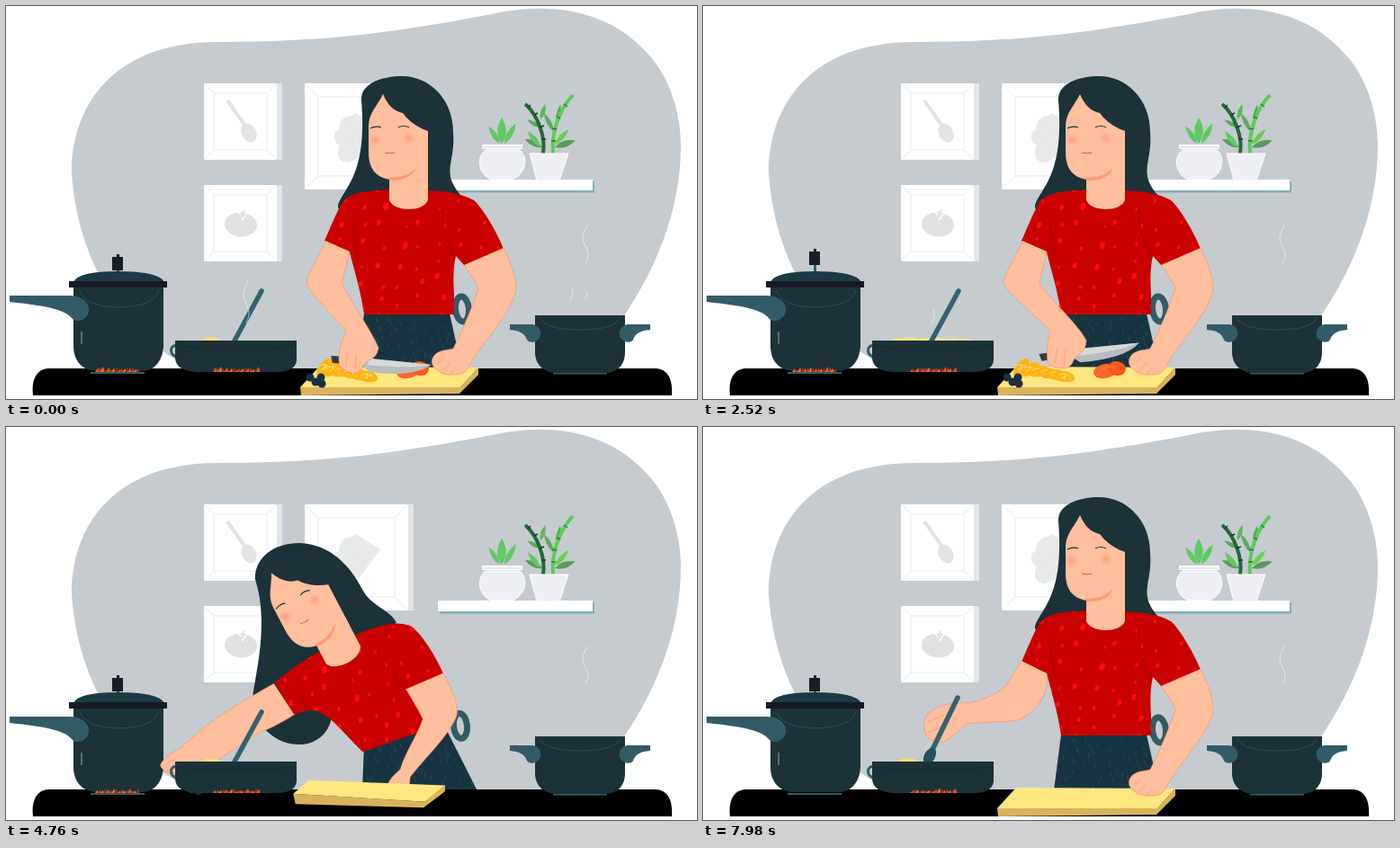
An HTML page with a canvas that plays this animation: 768 by 437 pixels, repeating every 8 s.

```html
<!DOCTYPE html>
<html lang="en">
<head>
<meta charset="utf-8">
<title>Kitchen</title>
<style>
html, body { margin: 0; width: 100%; height: 100%; overflow: hidden; background: #fff; }
canvas { display: block; width: 768px; height: 437px; }
</style>
</head>
<body>
<canvas id="stage"></canvas>
<script>
const LOOP = 8000, TAU = Math.PI * 2;
const SKIN = '#ffbe9d', LINE = '#f58f62', HAIR = '#1c3238', TEAL = '#335b66', RED = '#c90000';
const canvas = document.getElementById('stage'), g = canvas.getContext('2d');
const dpr = window.devicePixelRatio || 1;
canvas.width = 768 * dpr;
canvas.height = 437 * dpr;

// ---------- helpers ----------
const NUM = /-?[\d.]+/g;
const smooth = s => s * s * (3 - 2 * s);
const hash = n => { const v = Math.sin(n * 127.1 + 11.7) * 43758.5453; return v - Math.floor(v); };

function mix(a, b, s) {
  const target = b.match(NUM);
  let i = 0;
  return a.replace(NUM, v => (+v + (target[i++] - v) * s).toFixed(2));
}

// keys: [[time, string of numbers], ...]
function tween(keys, t) {
  if (t <= keys[0][0]) return keys[0][1];
  for (let i = 1; i < keys.length; i++) {
    const [t0, a] = keys[i - 1], [t1, b] = keys[i];
    if (t < t1) return mix(a, b, smooth((t - t0) / (t1 - t0)));
  }
  return keys[keys.length - 1][1];
}
const numbers = s => s.match(NUM).map(Number);

function fill(d, color) { g.fillStyle = color; g.fill(new Path2D(d)); }
function line(d, color, width = 1) {
  g.strokeStyle = color;
  g.lineWidth = width;
  g.stroke(new Path2D(d));
}
function oval(x, y, rx, ry, color, angle = 0) {
  g.fillStyle = color;
  g.beginPath();
  g.ellipse(x, y, rx, ry, angle, 0, TAU);
  g.fill();
}
function rect(x, y, w, h, color) { g.fillStyle = color; g.fillRect(x, y, w, h); }
function group(draw) { g.save(); draw(); g.restore(); }
function leaf(x, y, degrees, length, width, color) {
  group(() => {
    g.translate(x, y);
    g.rotate(degrees * Math.PI / 180);
    fill(`M0 0 Q${length * .45} ${-width} ${length} 0 Q${length * .45} ${width} 0 0Z`, color);
  });
}

// ---------- poses ----------
const lean = (up, mid, low) => [[2600, up], [3700, mid], [4250, mid], [5000, low], [5700, low], [6600, up]];

const headKeys = lean('447 215 0', '393 243 -17', '368 256 -31');

const hairKeys = lean(
  'M395 105 C394 85 420 78 440 78 C472 78 497 105 497 140 C500 175 482 185 507 212 C490 222 450 230 430 232 C400 235 368 235 369 222 C374 203 402 190 395 105Z',
  'M308 158 C307 132 326 116 356 116 C391 117 411 143 420 174 C425 200 440 206 452 218 C430 240 400 270 385 310 C370 352 300 347 303 300 C305 265 325 225 308 158Z',
  'M267 172 C267 148 290 133 317 133 C350 134 374 158 388 182 C400 200 420 200 428 217 C410 240 370 290 354 330 C345 376 270 364 265 300 C270 270 282 215 267 172Z');

const shirtKeys = lean(
  'M428 204 C405 206 385 205 374 218 C366 232 360 248 354 261 L382 274 C388 297 395 320 398 343 L498 343 L498 320 C497 305 497 290 500 278 L510 289 L553 270 C545 250 530 225 520 216 C505 208 490 206 469 205Z',
  'M370 228 C358 232 346 236 338 242 C330 248 324 253 320 258 L334 295 C358 285 372 318 395 353 L479 338 L484 322 C480 310 470 300 466 288 L466 291 L506 273 C497 255 485 232 470 220 C455 214 435 216 414 217Z',
  'M345 254 C330 264 315 275 308 280 C302 285 296 289 292 293 L316 329 C345 310 355 325 397 364 L450 341 L457 325 C452 315 445 305 439 292 L439 293 L480 275 C470 252 455 230 444 222 C425 214 405 224 387 233Z');

const skirtKeys = lean(
  'M398 342 L480 342 L493 342 L507 404 L390 404Z',
  'M397 351 L479 336 L490 345 L519 404 L396 404Z',
  'M398 362 L450 340 L490 335 L525 404 L396 404Z');

const bowKeys = lean('507 337', '508 340', '504 330');

const rightArmKeys = lean(
  'M553 269 C560 285 570 305 566 320 C558 345 530 375 517 396 C512 408 508 410 498 410 C485 412 470 402 474 392 C478 382 490 383 497 381 C510 355 520 330 525 314 C522 305 515 298 509 288 M478 399 L487 392 M485 405 L494 397 M493 409 L500 402',
  'M506 272 C514 288 523 305 519 320 C512 345 490 370 478 388 C475 400 470 418 458 419 C450 422 435 418 442 410 C450 400 455 385 462 378 C470 355 480 335 484 322 C478 310 470 300 465 290 M444 417 L448 412 M450 419 L454 413 M456 419 L460 413',
  'M480 274 C488 290 498 310 495 322 C485 345 455 370 440 390 C440 398 442 402 434 402 C425 402 417 402 418 396 C420 385 428 385 431 381 C435 365 450 345 457 326 C452 315 445 303 438 292 M423 401 L427 390 M430 401 L434 393 M436 401 L439 392');

const leftArm = {
  cut: 'M355 261 C348 278 335 298 334 308 C336 318 365 345 378 362 C372 375 368 390 371 400 C376 408 392 412 396 402 C400 392 412 395 414 380 C408 365 385 330 373 309 C376 295 380 285 382 273 M380 384 L378 401 M389 387 L388 405',
  raise: 'M355 261 C348 278 335 298 334 308 C336 318 375 348 386 362 C382 375 381 390 384 398 C392 404 408 405 411 396 C415 385 425 388 426 372 C420 358 390 330 374 309 C376 295 380 285 382 273 M394 380 L391 398 M403 382 L401 401',
  reach: 'M319 258 C300 266 280 275 265 283 C250 290 225 312 214 320 C195 325 182 326 176 333 C180 342 174 352 180 360 C190 372 200 370 205 368 C214 352 222 340 240 333 C275 322 310 306 334 294 M176 342 L194 346 M178 352 L194 355',
  knob: 'M291 294 C272 306 255 316 240 326 C222 338 200 356 189 368 C180 374 172 382 170 390 C174 398 184 396 190 392 C205 388 220 385 230 380 C260 365 285 350 295 342 C303 338 310 333 316 328 M173 388 L186 377 M178 393 L188 383',
  rest: 'M356 262 C350 280 338 300 338 316 C340 335 349 360 350 378 C340 392 322 402 319 408 C335 412 355 408 370 405 C380 406 390 406 390 401 C376 390 370 345 372 318 C378 300 384 285 385 275 M324 405 L344 396 M338 408 L354 399',
  stir: 'M354 260 C348 270 342 278 337 288 C325 298 308 305 295 307 C275 305 245 312 246 330 C244 345 255 352 268 350 C278 344 288 335 292 330 C310 328 340 328 350 326 C368 318 385 300 382 274 M250 328 L268 320 M250 339 L270 332'
};
const leftArmKeys = [[2600, leftArm.raise], [3700, leftArm.reach], [4250, leftArm.reach], [5000, leftArm.knob],
  [5700, leftArm.knob], [6500, leftArm.rest], [6900, leftArm.rest], [7600, leftArm.stir]];

const boardTopKeys = lean('M348 401 L525 402 L505 424 L327 424Z', 'M346 370 L498 387 L478 410 L323 394Z', 'M334 400 L485 402 L462 419 L318 412Z');
const boardSideKeys = lean(
  'M327 424 L505 424 L525 402 L525 410 L504 431 L328 433Z',
  'M323 394 L478 410 L498 387 L497 397 L477 418 L324 404Z',
  'M318 412 L462 419 L485 402 L485 408 L460 425 L321 424Z');
// shift x, shift y, angle, extra tomato shift
const foodKeys = [[2600, '0 0 0 0'], [3700, '10 -21 6 -22'], [4300, '10 -21 6 -22'], [4800, '-140 -15 0 -22']];
const spoonKeys = [[7200, '284 317 247 385'], [7600, '283 301 251 367']];

// ---------- room ----------
function pictureFrame(x, y, w, h, inset) {
  rect(x, y, w, h, '#fff');
  rect(x + w - 6, y, 6, h, '#e3e5e7');
  const r = x + w - 6, ix = x + inset, iy = y + inset, ir = r - inset, ib = y + h - inset;
  line(`M${ix} ${iy}H${ir}V${ib}H${ix}Z M${x} ${y}L${ix} ${iy} M${r} ${y}L${ir} ${iy} M${x} ${y + h}L${ix} ${ib} M${r} ${y + h}L${ir} ${ib}`, '#e9ebec');
}

function drawRoom() {
  fill('M73 185 C73 110 120 40 235 40 C360 40 440 28 540 9 C600 -5 670 2 715 55 C738 80 750 120 750 155 C750 230 720 295 688 343 L640 404 H215 C150 385 80 300 73 185Z', '#c6cbcf');
  pictureFrame(220, 86, 87, 85, 11);
  pictureFrame(220, 199, 87, 85, 11);
  pictureFrame(332, 86, 121, 118, 15);
  line('M246 105 L265 132', '#e2e3e4', 4);
  oval(270, 141, 8, 11, '#e2e3e4', -.5);
  oval(261, 243, 18, 13.5, '#e0e1e2', .1);
  line('M255 229 Q262 230 263 238 M263 238 Q265 231 271 230', '#fff', 1.5);
  line('M262 236 Q262 230 265 227', '#e0e1e2', 2);
  fill('M388 119 L416 136 L402 155 C395 165 390 172 380 174 C370 174 366 165 371 155 C364 152 362 140 370 138 C370 128 376 122 384 122Z', '#e8e9ea');
  line('M377 128 L400 155 M372 140 L392 165 M384 165 L405 145 M372 160 L398 131', '#dfe1e2', .7);

  rect(482, 195, 172, 12.5, '#7fb0b8');
  rect(480, 193, 172, 12, '#fff');
  leaf(551, 153, -90, 29, 9.5, '#62c868');
  leaf(549, 153, -123, 23, 6, '#62c868');
  leaf(554, 153, -61, 26, 6.5, '#62c868');
  fill('M533 160 C522 168 525 188 540 193 H562 C578 188 581 168 571 160Z', '#eeeff4');
  line('M533 160 C522 168 525 188 540 193 H562 C578 188 581 168 571 160Z', '#fff');
  rect(529, 154, 45, 5, '#fff');
  rect(530, 156, 43, 2, '#e6e8ee');

  leaf(594, 135, -150, 17, 4.5, '#5fa862');
  leaf(596, 157, -155, 21, 6, '#5a9c5d');
  leaf(594, 157, -128, 23, 6, '#62c868');
  leaf(594, 126, -72, 18, 5, '#5fb564');
  leaf(609, 140, -118, 24, 5, '#5fa862');
  leaf(612, 133, -80, 24, 5, '#4fae50');
  leaf(610, 154, -48, 23, 5.5, '#65d04f');
  leaf(610, 157, -18, 24, 7, '#5a9c5d');
  line('M597 164 C600 146 591 121 577 109', '#24693a', 4);
  line('M608 164 C606 140 615 115 630 99', '#5fca5c', 4);
  line('M595 148h5 M593 135l5 -2 M587 121l4 -2 M580 113l3 -3', '#173a28', 1.5);
  line('M606 150h5 M607 136l5 1 M612 123l4 2 M620 109l4 3', '#24803a', 1.5);
  fill('M582 164 H625 L615 194 H590Z', '#eeeff4');
  line('M582 164 H625 L615 194 H590Z', '#fff');
}

// ---------- cookware ----------
function flames(x, width, t) {
  const step = Math.floor(t / 70), count = Math.round(width / 3);
  const colors = ['#e2581f', '#b3401a', '#f0762c', '#8c3416'];
  for (let i = 0; i < count; i++) {
    const h = 2.5 + 3.5 * hash(i * 7 + step * 3), px = x + i * 3;
    fill(`M${px - 1} 407 L${px + 1 + 2 * hash(i + step)} ${407 - h} L${px + 3.5} 407Z`, colors[i % 4]);
  }
}

function drawPots(t) {
  const lift = t < 3360 ? 6 * Math.abs(Math.sin(Math.PI * t / 1680)) : 0;
  rect(123, 288 - lift, 3, 10 + lift, TEAL);
  rect(118, 279 - lift, 12, 15, '#191d29');
  rect(123, 276 - lift, 3, 4, '#191d29');
  fill('M75 307 Q80 295 124 295 Q170 295 176 307Z', '#1b3a43');
  fill('M75 312 H175 V378 C174 396 164 406 150 406 H100 C85 405 75 395 75 378Z', HAIR);
  rect(70, 306, 109, 7, '#171a26');
  line('M82 316 Q86 334 125 335 Q165 334 170 316', '#37525a', .8);
  line('M84 362V376', '#b9c3c6', .8);
  fill('M4 322 H70 C90 322 95 336 91 343 C86 352 76 351 74 348 C66 338 50 334 4 329Z', TEAL);
  rect(94, 407, 60, 2, TEAL);
  if (t < 5000) flames(100, 48, t);

  fill('M588 344 H688 V385 C688 402 676 408 665 408 H610 C597 407 588 398 588 385Z', HAIR);
  fill('M560 354 H585 C594 355 596 364 593 369 C589 375 581 375 579 371 C576 363 570 361 560 360Z', TEAL);
  fill('M716 354 H691 C682 355 680 364 683 369 C687 375 695 375 697 371 C700 363 706 361 716 360Z', TEAL);
  line('M594 347 Q600 360 638 360 Q676 360 682 347', '#37525a', .8);
  rect(608, 408, 60, 1.5, TEAL);
}

function drawPan(t) {
  const full = t > 4800 && t < 6300;
  oval(228, 373, 12, 4.5, '#f7df75');
  for (let i = 0; i < 6; i++) {
    const h = full ? 5 + Math.sin(t / 160 + i * 2) : 4 * Math.max(0, Math.sin(TAU * (t - 1900) / 3400 + i * .2));
    if (h > .3) oval(217 + i * 15, 373, 10, h, '#f5e389');
  }
  oval(283, 364, 2.5, 1.5, '#dcc3b5');
  const [x0, y0, x1, y1] = numbers(tween(spoonKeys, t));
  g.lineCap = 'round';
  line(`M${x0} ${y0}L${x1} ${y1}`, '#33626d', 5.5);
  g.lineCap = 'butt';
  oval(x1 + 1, y1 - 1, 6, 10, '#285059', .5);
  line('M191 378 C181 375 181 390 191 390', TEAL, 3);
  fill('M188 372 H323 V394 C322 404 312 407 300 407 H212 C198 406 189 402 188 392Z', HAIR);
  line('M189 378 Q205 379 212 380 H300 Q315 379 322 377', '#17292f', .8);
  flames(231, 52, t + 35);
}

function wisp(x, y, height, from, to) {
  if (to <= from) return;
  g.beginPath();
  for (let s = from; s <= to + .001; s += .05) g.lineTo(x + 3 * Math.sin(s * 7), y - height * s);
  g.strokeStyle = 'rgba(255,255,255,.55)';
  g.lineWidth = 1;
  g.stroke();
}

function drawSteam(t) {
  const clamp = v => Math.min(1, Math.max(0, v));
  const p = (t + 100) % 3400, grow = clamp(p / 300), gone = clamp((p - 850) / 250);
  wisp(644, 286, 42, 0, 1);
  wisp(627, 328, 52, gone, grow);
  wisp(643, 327, 30, gone, grow);
  const q = (t + 950) % 3400;
  wisp(254 + 13 * clamp((q - 100) / 800), 354 - 20 * clamp((q - 900) / 800), 48, clamp((q - 1400) / 400), clamp(q / 200));
}

// ---------- cook ----------
function drawHead(x, y, degrees) {
  group(() => {
    g.translate(x, y);
    g.rotate(degrees * Math.PI / 180);
    g.translate(-447, -215);
    fill('M426 180 H469 V216 Q464 226 447 226 Q430 225 426 216Z', SKIN);
    fill('M419 98 C424 110 431 117 441 119 L445 124 C452 131 460 136 469 139 V190 L426 193 C410 190 403 180 403 162 V132 C404 118 412 112 419 98Z', SKIN);
    fill('M425 191 Q444 192 456 180 Q449 195 426 194Z', '#ff9a70');
    for (const [cx, cy] of [[410, 149], [448, 147]]) {
      const blush = g.createRadialGradient(cx, cy, 1, cx, cy, 7);
      blush.addColorStop(0, '#ffa282');
      blush.addColorStop(1, 'rgba(255,172,142,.15)');
      oval(cx, cy, 7, 7, blush);
    }
    line('M405 136 Q411 133 417 135 M436 135 Q442 132 448 135', HAIR, 1.2);
    line('M421 163 Q427 164.5 432 163', '#bd6650', 1);
  });
}

function drawBody(t) {
  const [hx, hy, angle] = numbers(tween(headKeys, t));
  fill(tween(hairKeys, t), HAIR);
  const [bx, by] = numbers(tween(bowKeys, t));
  g.strokeStyle = TEAL;
  g.lineWidth = 7;
  g.beginPath();
  g.ellipse(bx, by, 7.5, 14, -.1, 0, TAU);
  g.stroke();

  const skirt = tween(skirtKeys, t);
  fill(skirt, '#183440');
  group(() => {
    g.clip(new Path2D(skirt));
    for (let i = 0; i < 75; i++) {
      const x = 392 + 132 * hash(i), y = 345 + 58 * hash(i + 300);
      line(`M${x} ${y}l1 5`, '#2b4a57', .8);
    }
  });

  const shirt = tween(shirtKeys, t);
  fill(shirt, RED);
  group(() => {
    g.clip(new Path2D(shirt));
    g.translate(hx, hy);
    g.rotate(angle * .8 * Math.PI / 180);
    g.translate(-447, -215);
    for (let i = 0; i < 80; i++) {
      const x = 345 + (i % 10) * 22 + 14 * hash(i), y = 195 + Math.floor(i / 10) * 21 + 14 * hash(i + 50);
      const r = 1.2 + 1.8 * hash(i + 99);
      oval(x, y, r, r * 1.4, '#fb0c0c', .4);
    }
    g.setLineDash([5, 3]);
    line('M485 226 C483 248 491 264 498 280 M386 244 L391 278', '#6d1212', .9);
  });
  drawHead(hx, hy, angle);
}

function drawArm(path) {
  fill(path, SKIN);
  line(path, LINE, .6);
}

function drawFood(t) {
  if (t > 4800) return;
  const [dx, dy, angle, tomato] = numbers(tween(foodKeys, t));
  group(() => {
    g.translate(390 + dx, 405 + dy);
    g.rotate(angle * Math.PI / 180);
    g.translate(-390, -405);
    for (let i = 0; i < 6; i++) {
      const x = 354 + i * 9.5, y = 402 + i * 2;
      oval(x, y, 12, 6, '#fdb515', i < 3 ? -.9 + i * .35 : .2);
      line(`M${x - 7} ${y - 1}q7 -5 14 2 M${x - 4} ${y + 2}l9 -4 M${x} ${y - 4}v7`, '#ffe08a', .9);
    }
    for (const [x, y] of [[338, 413], [344, 418], [350, 413], [351, 420]]) oval(x, y, 4.5, 4.5, '#1d2f3f');
    oval(447 + tomato, 406, 13, 8, '#ff6430', -.2);
    oval(460 + tomato, 403, 10, 8, '#f9571f', .2);
    line(`M${440 + tomato} 408q8 -8 18 -7`, '#ff8a5c', .8);
  });
}

function drawKnife(raise) {
  group(() => {
    g.translate(361 + 13 * raise, 393 - 2 * raise);
    g.rotate((3 - 11.5 * raise) * Math.PI / 180);
    fill('M0 -4 H38 V4 H2Z', '#333b42');
    fill('M36 -4 L112 0 Q95 15 44 12 L36 5Z', '#b9bdc0');
    fill('M40 -3 L110 0 Q90 6 42 4Z', '#d6d9db');
  });
}

function draw(t) {
  g.setTransform(dpr, 0, 0, dpr, 0, 0);
  g.clearRect(0, 0, 768, 437);
  drawRoom();
  drawBody(t);
  fill('M47 403 H722 C736 404 741 415 740 433 H30 C28 417 33 404 47 403Z', '#000');
  drawPots(t);

  const carrying = t > 2900 && t < 4900;
  const rightArm = tween(rightArmKeys, t);
  if (carrying) drawArm(rightArm);
  fill(tween(boardSideKeys, t), '#d9b35c');
  fill(tween(boardTopKeys, t), '#ffe680');
  drawFood(t);

  const raise = t < 2520 ? .5 - .5 * Math.cos(TAU * t / 1680) : 1;
  if (t < 2900) drawKnife(raise);
  if (!carrying) drawArm(rightArm);
  drawArm(t < 2600 ? mix(leftArm.cut, leftArm.raise, raise) : tween(leftArmKeys, t));
  drawPan(t);
  drawSteam(t);
}

function frame() {
  draw(performance.now() % LOOP);
  requestAnimationFrame(frame);
}
frame();
</script>
</body>
</html>
```
